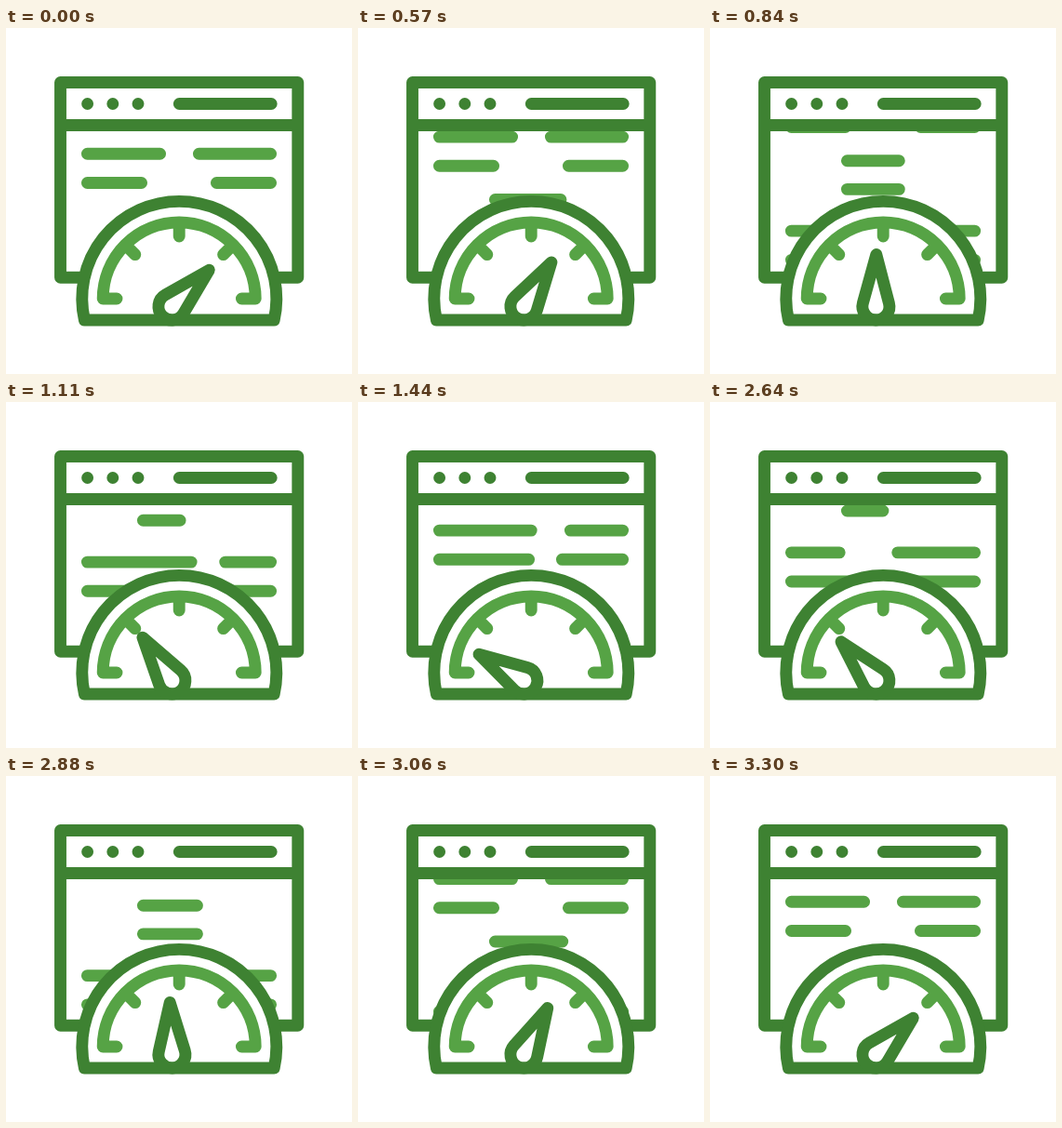
An HTML page that plays this animation: 372 by 372 pixels, repeating every 3.6 s.

```html
<!DOCTYPE html>
<html lang="en">
<head>
<meta charset="utf-8">
<title>Page speed</title>
<style>
  html, body { margin: 0; width: 100%; height: 100%; overflow: hidden; background: #fff; }
  svg { display: block; width: 100%; height: 100%; }
  path { fill: none; stroke-width: 12.9; stroke-linecap: round; stroke-linejoin: round; }
  .dark { stroke: #3e8232; }
  .light { stroke: #56a345; }
  #dome { fill: #fff; }
</style>
</head>
<body>
<svg viewBox="0 0 372 372">
  <clipPath id="view"><path d="M60 104H312V268H60Z"/></clipPath>
  <g clip-path="url(#view)"><path id="text" class="light"/></g>

  <path class="dark" d="M84 268.2H58.5V58.5H313.8V268.2H289M58.5 104.5H313.8M186.3 81.5H285.2"/>
  <path class="dark" d="M87.6 81.5h.01M114.8 81.5h.01M142 81.5h.01"/>

  <path id="dome" class="dark" d="M84.4 314A104.5 104.5 0 1 1 288.2 314Z"/>
  <path class="light" d="M119 291H104.2A82 82 0 0 1 268.2 291H253.4M186.2 209V224M128.2 233l10.6 10.6M244.2 233l-10.6 10.6"/>
  <path id="needle" class="dark" d="M0-56L14-3.8A14.5 14.5 0 1 1-14-3.8Z"/>
</svg>
<script>
const LOOP = 3600, STEP = 30, CAP = 6.4;
const text = document.getElementById('text');
const needle = document.getElementById('needle');

const smooth = (t, from, to) => {
  const u = Math.min(1, Math.max(0, (t - from) / (to - from)));
  return u * u * (3 - 2 * u);
};

const bar = (left, right, y) => `M${left + CAP} ${y}H${right - CAP}`;
const row = (left, right, y) => bar(81, left, y) + bar(right, 291, y);

function draw() {
  let t = performance.now() % LOOP;
  t -= t % STEP;
  const k = t / LOOP;
  const p = smooth(t, 300, 1500) - smooth(t, 2400, 3300);

  // The page scrolls with the needle while some bars change length
  const top = 135.3 - 141 * p;
  const middle = 230 + 6 * k - 51 * p;
  text.setAttribute('d',
    row(172, 201, top) + row(152, 220, top + 31.2) +
    bar(141, middle, top + 67.4) + bar(141, middle, top + 98) +
    row(249 - 141 * k, 254 - 80 * k, top + 142.8) + row(190, 213, top + 174));
  needle.setAttribute('transform', `translate(178.4 299.5) rotate(${45.5 - 106 * p})`);
  requestAnimationFrame(draw);
}
draw();
</script>
</body>
</html>
```
